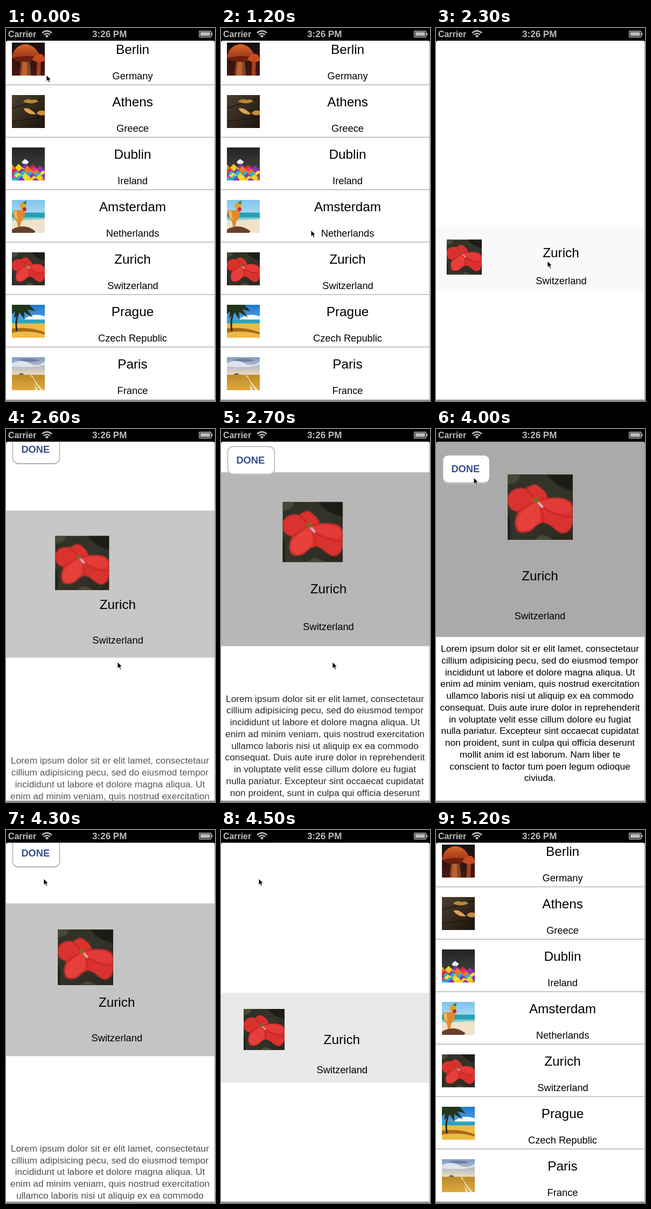
Write an HTML page that moves like this. It is 388 px wide and 690 px high and loops after 5.3 s.

```html
<!DOCTYPE html>
<html lang="en">
<head>
<meta charset="utf-8">
<title>Expanding list cell</title>
<style>
html, body { margin: 0; width: 100%; height: 100%; overflow: hidden; background: #fff; }
svg { display: block; }
#stage { width: 100vw; height: 100vh; }
text { font-family: "Liberation Sans", Arial, sans-serif; text-anchor: middle; fill: #000; }
.title { font-size: 24.3px; }
.country { font-size: 18.3px; }
.body { font-size: 17.3px; }
.status { font-size: 17px; font-weight: bold; fill: #bdbdbd; }
</style>
</head>
<body>
<svg id="stage" viewBox="0 0 388 690">
  <defs>
    <linearGradient id="dusk" x2="0" y2="1"><stop stop-color="#160f12"/><stop offset="1" stop-color="#4a1712"/></linearGradient>
    <linearGradient id="cap" x2="0" y2="1"><stop stop-color="#d8642a"/><stop offset="1" stop-color="#8c2a10"/></linearGradient>
    <linearGradient id="wood" x2="1" y2="1"><stop stop-color="#4a4030"/><stop offset="1" stop-color="#1c130c"/></linearGradient>
    <linearGradient id="slate" x2="0" y2="1"><stop stop-color="#242424"/><stop offset="1" stop-color="#4c4c4c"/></linearGradient>
    <linearGradient id="haze" x2="0" y2="1"><stop stop-color="#7fc4ee"/><stop offset="1" stop-color="#e4f3fa"/></linearGradient>
    <linearGradient id="azure" x2="0" y2="1"><stop stop-color="#1f78d2"/><stop offset="1" stop-color="#8fd0f0"/></linearGradient>
    <linearGradient id="evening" x2="0" y2="1"><stop stop-color="#7f9cc8"/><stop offset="1" stop-color="#f0dcc0"/></linearGradient>
    <linearGradient id="wheat" x2="0" y2="1"><stop stop-color="#b98a2c"/><stop offset="1" stop-color="#e0a93c"/></linearGradient>
    <linearGradient id="leafy" x2="1" y2="1"><stop stop-color="#2f2f25"/><stop offset=".5" stop-color="#33342a"/><stop offset="1" stop-color="#2c261d"/></linearGradient>
    <filter id="soft"><feGaussianBlur stdDeviation="1.2"/></filter>

    <symbol id="pic0" viewBox="0 0 60 60">
      <path fill="url(#dusk)" d="M0 0H60V60H0Z"/>
      <path fill="#7d4a2c" d="M17 30H32L35 60H14Z"/>
      <path fill="#c2602c" d="M20 30H27L28 60H18Z"/>
      <path fill="#a4401e" d="M46 32H53L52 60H45Z"/>
      <path fill="url(#cap)" d="M0 27Q3 7 22 3Q42 2 51 25Q40 36 22 35Q6 35 0 27Z"/>
      <path fill="#6c200e" d="M1 28Q24 22 50 26Q40 36 22 35Q6 35 1 28Z"/>
      <path fill="#c84a1c" d="M37 31Q44 18 54 21Q60 24 60 33Q49 39 37 31Z"/>
    </symbol>
    <symbol id="pic1" viewBox="0 0 60 60">
      <path fill="url(#wood)" d="M0 0H60V60H0Z"/>
      <path stroke="#17100b" d="M0 24L60 6M0 48L60 40"/>
      <path fill="#b98738" d="M20 12Q27 5 36 9Q45 6 48 12Q34 18 20 12Z"/>
      <path fill="#dda24a" d="M21 25Q30 20 44 35Q29 37 21 25Z"/>
      <path fill="#c98d3c" d="M45 33Q50 26 60 29V36Q51 39 45 33Z"/>
    </symbol>
    <symbol id="pic2" viewBox="0 0 60 60">
      <path fill="url(#slate)" d="M0 0H60V60H0Z"/>
      <g id="tents"></g>
      <path fill="#f4f4f4" d="M18 26L24 21L31 26L28 30H20Z"/>
    </symbol>
    <symbol id="pic3" viewBox="0 0 60 60">
      <path fill="url(#haze)" d="M0 0H60V60H0Z"/>
      <path fill="#279fb4" d="M0 23H60V35H0Z"/>
      <path fill="#7fd0cc" d="M0 32H60V37H0Z"/>
      <path fill="#efe3cd" d="M0 38L60 35V60H0Z"/>
      <path fill="#68402a" d="M0 54Q22 41 43 57L40 60H0Z"/>
      <path fill="#e08a30" d="M2 19H24Q25 32 17 39L15 49H11L9 39Q1 32 2 19Z"/>
      <path fill="#f6bd62" d="M4 21H9Q8 31 12 37Q3 32 4 21Z"/>
      <path fill="#3f7a2c" d="M15 8L27 1L25 9Z"/>
      <circle cx="20" cy="12" r="6" fill="#e2a52c"/>
      <circle cx="23" cy="17" r="3.5" fill="#c42a22"/>
    </symbol>
    <symbol id="pic4" viewBox="0 0 121 121">
      <path fill="url(#leafy)" d="M0 0H121V121H0Z"/>
      <g filter="url(#soft)">
        <path fill="#1c1f18" d="M72 0Q90 24 121 30V0ZM0 70Q8 92 4 121H0Z"/>
        <path fill="#4a4a38" d="M0 0H22Q26 14 0 18ZM50 121Q62 104 84 121Z"/>
        <path fill="#da302e" d="M0 42Q4 31 14 27Q26 23 34 27Q36 22 43 21Q50 15 58 22Q71 30 75 44Q92 41 107 45Q119 49 121 60V86Q120 98 114 104Q106 111 98 108Q88 103 80 95Q72 90 66 89Q57 91 50 98Q42 107 34 107Q24 109 18 105Q11 94 15 80L19 69Q8 68 3 60Q0 54 0 42Z"/>
        <path fill="#e63f3b" d="M54 50Q26 64 17 84Q16 102 28 105Q42 104 52 93Q64 84 60 60Z"/>
        <path fill="#e43b38" d="M60 50Q84 42 104 48Q118 53 119 66Q106 76 88 70Q72 64 60 50Z"/>
        <path fill="none" stroke="#b82224" stroke-width="2" d="M56 56Q84 76 119 79M52 49Q34 60 18 70M52 46Q42 34 34 28M58 46Q66 45 74 44M60 60Q66 76 66 88"/>
        <path stroke="#f2d5dd" stroke-width="3" d="M57 52L65 61"/>
        <circle cx="53" cy="47" r="4.5" fill="#657321"/>
      </g>
    </symbol>
    <symbol id="pic5" viewBox="0 0 60 60">
      <path fill="url(#azure)" d="M0 0H60V60H0Z"/>
      <path fill="#f4fafc" d="M25 24Q42 14 60 21V27H22Z"/>
      <path fill="#2aa4c2" d="M0 27H60V34H0Z"/>
      <path fill="#eebb45" d="M0 34H60V60H0Z"/>
      <path fill="#a86b18" d="M0 43Q32 39 60 50V54Q28 45 0 51Z"/>
      <path fill="none" stroke="#2d2714" stroke-width="3" d="M9 48Q5 28 14 9"/>
      <path fill="#23351a" d="M0 0H32L43 12L28 8L38 23L22 13L23 27L14 14L4 25L6 12L0 17Z"/>
    </symbol>
    <symbol id="pic6" viewBox="0 0 60 60">
      <path fill="url(#evening)" d="M0 0H60V33H0Z"/>
      <path fill="#dfe3ee" d="M0 11Q18 3 32 11T60 8V14Q38 20 0 17Z"/>
      <path fill="#6f7ca4" d="M10 5Q30 0 52 6Q30 11 10 5Z"/>
      <path fill="url(#wheat)" d="M0 32H60V60H0Z"/>
      <path fill="#5e5a34" d="M12 32Q17 26 23 32Z"/>
      <path fill="#f2dfb0" d="M34 33H37Q42 45 57 60H43Q42 46 34 33Z"/>
      <path stroke="#b98a2c" stroke-width="2" d="M36 36Q42 49 50 60" fill="none"/>
    </symbol>
  </defs>

  <rect width="388" height="690" fill="#fff"/>
  <g id="list"></g>

  <g id="detail">
    <rect id="panel" width="387"/>
    <use id="photo" href="#pic4"/>
    <text id="city" class="title">Zurich</text>
    <text id="land" class="country">Switzerland</text>
    <g id="copy"></g>
    <g id="done">
      <rect x="12.5" y="49.6" width="87" height="51.5" rx="10" fill="#d2d2d2"/>
      <rect x="12.5" y="48.4" width="87" height="51" rx="10" fill="#fff" stroke="#ababab" stroke-width="1.4"/>
      <text x="54.8" y="80" font-size="18.3" font-weight="bold" style="fill:#34508a">DONE</text>
    </g>
  </g>

  <path fill="#8c8c8c" d="M0 687.4H388V690H0Z"/>
  <path fill="#a4a4a4" d="M387 23H388V690H387Z"/>
  <rect width="388" height="23.5" fill="#000"/>
  <path fill="#000" d="M0 23V27Q0 23.5 4 23.5ZM388 23V27Q388 23.5 384 23.5Z"/>
  <text class="status" x="4" y="17" style="font-size:15.9px;text-anchor:start">Carrier</text>
  <text class="status" x="192.2" y="17">3:26 PM</text>
  <g fill="none" stroke="#bdbdbd" stroke-width="2.5">
    <path d="M67 9.2Q76 1.6 85 9.2M70.3 12.5Q76 7.5 81.7 12.5"/>
    <path fill="#bdbdbd" stroke="none" d="M72.6 14.4Q76 11.6 79.4 14.4L76 18Z"/>
  </g>
  <rect x="358.7" y="5.7" width="22" height="11" rx="1" fill="none" stroke="#bdbdbd" stroke-width="1.4"/>
  <path fill="#bdbdbd" d="M360.6 7.6H378.8V14.8H360.6ZM381.4 9H383.4V13.4H381.4Z"/>

  <path id="cursor" fill="#000" stroke="#fff" stroke-width=".9" d="M0 0V12L2.8 9.4L4.8 14L6.8 13.1L4.9 8.7H8.6Z"/>
</svg>
<script>
const LOOP = 5300, STEP = 100;
const OPEN = 2161, CLOSE = 4018, MORPH = 740, FADE = 250;
const $ = id => document.getElementById(id);
const clamp = x => Math.min(1, Math.max(0, x));
const mix = (a, b, p) => a + (b - a) * p;
const set = (el, attrs) => { for (const k in attrs) el.setAttribute(k, attrs[k]); };

const places = [
  ["Berlin", "Germany"], ["Athens", "Greece"], ["Dublin", "Ireland"], ["Amsterdam", "Netherlands"],
  ["Zurich", "Switzerland"], ["Prague", "Czech Republic"], ["Paris", "France"]
];
const CHOSEN = 4, ROW = 97;

const lorem = [
  "Lorem ipsum dolor sit er elit lamet, consectetaur",
  "cillium adipisicing pecu, sed do eiusmod tempor",
  "incididunt ut labore et dolore magna aliqua. Ut",
  "enim ad minim veniam, quis nostrud exercitation",
  "ullamco laboris nisi ut aliquip ex ea commodo",
  "consequat. Duis aute irure dolor in reprehenderit",
  "in voluptate velit esse cillum dolore eu fugiat",
  "nulla pariatur. Excepteur sint occaecat cupidatat",
  "non proident, sunt in culpa qui officia deserunt",
  "mollit anim id est laborum. Nam liber te",
  "conscient to factor tum poen legum odioque",
  "civiuda."
];

// time, x, y
const cursorPath = [
  [0, 75, 87], [300, 77, 92], [600, 85, 160], [800, 85, 232], [950, 82, 290], [1080, 135, 346],
  [1200, 167, 374], [1600, 207, 431], [2800, 207, 431], [3300, 82, 116], [3700, 70, 90],
  [4500, 70, 90], [4900, 20, -20], [LOOP, 20, -20]
];

function build() {
  $("list").innerHTML = places.map(([city, land], i) => {
    const y = 8 + ROW * i;
    const line = i ? `<rect y="${y - .5}" width="387" height="1.2" fill="#a2a2a2"/>` : "";
    const cell = i === CHOSEN ? "" :
      `<use href="#pic${i}" x="11" y="${y + 19}" width="61" height="61"/>
       <text class="title" x="235" y="${y + 39.5}">${city}</text>
       <text class="country" x="235" y="${y + 87}">${land}</text>`;
    return cell + line;
  }).join("");

  $("copy").innerHTML = lorem.map((line, i) =>
    `<text class="body" x="193" y="${412 + 21.75 * i}">${line}</text>`).join("");

  let seed = 7;
  const rnd = () => (seed = seed * 16807 % 2147483647) / 2147483647;
  const hues = ["#e8318a", "#f4d01e", "#22b4d8", "#8a35b0", "#f07820", "#e02a3a", "#f6e23c"];
  let tents = "";
  for (let i = 0; i < 34; i++) {
    const x = (i * 13) % 62 - 1, y = 32 + i * .82 + Math.abs(x - 28) * .08, w = 5 + rnd() * 3;
    tents += `<path fill="${hues[Math.floor(rnd() * hues.length)]}" d="M${x - w} ${y + 2}L${x} ${y - 4}L${x + w} ${y + 1}L${x + 3} ${y + 6}H${x - 4}Z"/>`;
  }
  $("tents").innerHTML = tents;
}

// cubic-bezier(.42, 0, .58, 1)
function ease(x) {
  if (x <= 0 || x >= 1) return clamp(x);
  let lo = 0, hi = 1;
  for (let i = 0; i < 24; i++) {
    const s = (lo + hi) / 2, r = 1 - s;
    if (1.26 * s * r * r + 1.74 * s * s * r + s * s * s < x) lo = s; else hi = s;
  }
  return lo * lo * (3 - 2 * lo);
}

function cursorAt(t) {
  const i = cursorPath.findIndex(k => k[0] > t);
  const a = cursorPath[i - 1], b = cursorPath[i];
  const p = (t - a[0]) / (b[0] - a[0]);
  return [mix(a[1], b[1], p), mix(a[2], b[2], p)];
}

function draw(t) {
  const p = ease((t - OPEN) / MORPH) - ease((t - CLOSE) / MORPH);
  const hidden = clamp((t - OPEN + FADE) / FADE) - clamp((t - CLOSE - MORPH) / FADE);
  const top = mix(396, 23, p), grey = Math.round(mix(255, 170, p)), size = mix(61, 121, p);

  set($("list"), { opacity: 1 - hidden });
  set($("panel"), {
    y: top, height: mix(496, 384.7, p) - top,
    fill: `rgb(${grey},${grey},${grey})`, "fill-opacity": p > 0 ? 1 : 0
  });
  set($("photo"), { x: mix(11, 133, p), y: mix(415, 84, p), width: size, height: size });
  set($("city"), { x: mix(235, 193, p), y: mix(435.5, 280, p) });
  set($("land"), { x: mix(235.5, 193, p), y: mix(483, 351.7, p) });
  set($("copy"), { transform: `translate(0 ${605 * (1 - p)})`, opacity: p });
  set($("done"), { transform: `translate(0 ${-104 * (1 - p)})` });
  set($("cursor"), { transform: `translate(${cursorAt(t)})` });
}

build();
const start = performance.now();
function tick() {
  const t = Math.max(0, performance.now() - start) % LOOP;
  draw(Math.floor(t / STEP) * STEP);
  requestAnimationFrame(tick);
}
tick();
</script>
</body>
</html>
```
